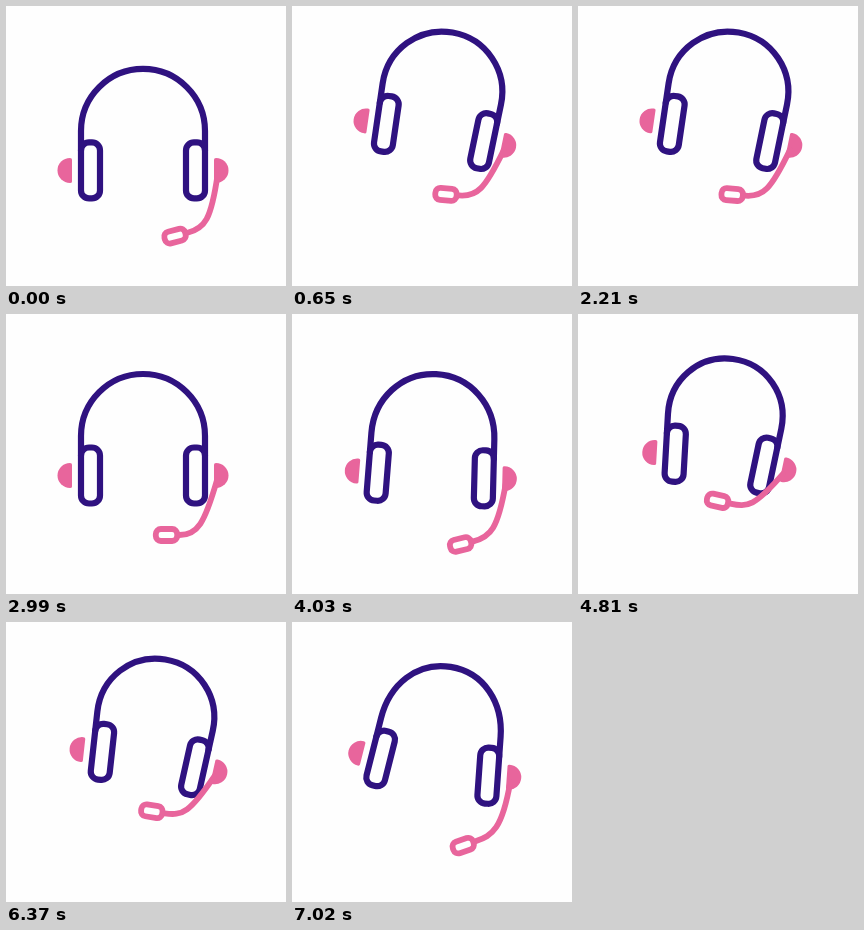
An HTML page that plays this animation: 280x280 px, repeating every 7150 ms.

```html
<!DOCTYPE html>
<html lang="en">
<head>
<meta charset="utf-8">
<title>Jumping headset</title>
<style>
  html, body { margin: 0; width: 100%; height: 100%; overflow: hidden; background: #fefefe; }
  svg { display: block; width: 100vw; height: 100vh; }
  .navy { fill: none; stroke: #2f1280; stroke-width: 6.2; stroke-linecap: round; stroke-linejoin: round; }
  .pink { fill: none; stroke: #e8659c; stroke-width: 5.8; stroke-linecap: round; }
  .ear { fill: #e8659c; }
</style>
</head>
<body>
<svg viewBox="0 0 280 280">
  <defs>
    <g id="cup">
      <rect class="navy" x="-9.5" y="-28" width="19" height="56" rx="8"/>
      <path class="ear" d="M18.5-11Q18.5-12.5 20.5-12.5A12.5 12.5 0 0 1 20.5 12.5Q18.5 12.5 18.5 11Z"/>
    </g>
  </defs>
  <g id="head">
    <path id="band" class="navy"/>
    <g id="left"><use href="#cup" transform="scale(-1 1)"/></g>
    <g id="right"><use href="#cup"/></g>
  </g>
  <path id="arm" class="pink"/>
  <rect id="tip" class="pink" x="-10.7" y="-6" width="21.4" height="12" rx="5"/>
</svg>
<script>
// One jump lasts CYCLE steps; phases below are counted in steps
const STEP = 130, COUNT = 55, CYCLE = 11.75;

const ramp = (t, a, b) => Math.min(1, Math.max(0, (t - a) / (b - a)));
const smooth = (t, a, b) => { const u = ramp(t, a, b); return u * u * (3 - 2 * u); };
const scale = (v, neg, pos) => v * (v < 0 ? neg : pos);

// Half a sine wave that starts at a phase and may wrap round the cycle
function pulse(t, from, len) {
  const u = (t - from + CYCLE) % CYCLE / len;
  return u < 1 ? Math.sin(Math.PI * u) : 0;
}

function pose(t) {
  const hop = 35 * (smooth(t, 1, 2.6) - ramp(t, 5.5, 7.5) ** 2.2);
  const dip = 13 * (pulse(t, -0.1, 1.4) + pulse(t, 7.5, 1.4));
  const air = smooth(t, 0.8, 2.2) - smooth(t, 6.8, 7.9);

  // The band is pinched at take-off and springs back while in the air
  const loose = smooth(t, 0.9, 1.7) - smooth(t, 7.3, 8.3);
  const spring = Math.exp(-0.12 * (t - 1.75)) * Math.cos(2 * Math.PI * (t - 1.75) / 3.4);
  const splay = loose * (2.2 * air - 6 * spring);

  const sag = pulse(t, -0.4, 1.6) + pulse(t, 7.3, 1.6);
  const armDeg = scale(splay, -5.8, -1.2) - 11 * sag + 7 * pulse(t, 8.3, 1);
  return {
    x: 137 + 6 * air,
    y: 161.5 - hop + dip,
    tilt: 10 * air,
    dist: 52.5 + scale(splay, 1.8, 0.4),
    splay,
    armDeg,
    tipDeg: scale(armDeg, 1.9, 0.5) - 1.5 * Math.max(0, splay),
    reach: 1 + 0.012 * splay
  };
}

const el = id => document.getElementById(id);
const set = (id, name, value) => el(id).setAttribute(name, value);
const place = (id, x, y, deg) => set(id, 'transform', `translate(${x} ${y}) rotate(${deg})`);
const pt = p => p.map(v => v.toFixed(2)).join(' ');

// Turn a vector by some degrees, then move it
function turn([x, y], deg, [ox, oy]) {
  const a = deg * Math.PI / 180, s = Math.sin(a), c = Math.cos(a);
  return [ox + x * c - y * s, oy + x * s + y * c];
}

function draw(phase) {
  const { x, y, tilt, dist, splay, armDeg, tipDeg, reach } = pose(phase);
  place('head', x, y, tilt);
  place('left', -dist, 0, splay);
  place('right', dist, 0, -splay);

  // Band: straight ends along the cups, joined by two arcs at the crown
  const side = (k, dy) => pt(turn([k * 9.5, dy], -k * splay, [k * dist, 0]));
  const h = 34.2, top = -101.5, bend = -39.5;
  set('band', 'd', `M${side(-1, -20)}L${side(-1, bend)}` +
    `C${side(-1, bend - h)} ${-h} ${top} 0 ${top}` +
    `C${h} ${top} ${side(1, bend - h)} ${side(1, bend)}L${side(1, -20)}`);

  // Arm: swings about the right ear and ends along the tip's axis
  const ear = turn([21, 0], -splay, [dist, 0]);
  const pivot = turn(ear, tilt, [x, y]);
  const onArm = (dx, dy) => turn([dx * reach, dy * reach], armDeg, pivot);
  const tip = onArm(-50, 59.5);
  const onTip = dx => pt(turn([dx, 0], tipDeg, tip));
  set('arm', 'd', `M${pt(onArm(0.5, 4.5))}C${pt(onArm(-12, 48))} ${onTip(31)} ${onTip(13)}`);
  place('tip', tip[0], tip[1], tipDeg);
}

const start = performance.now();
function tick() {
  const n = Math.floor((performance.now() - start) / STEP) % COUNT;
  draw(n % CYCLE);
  requestAnimationFrame(tick);
}
tick();
</script>
</body>
</html>
```
